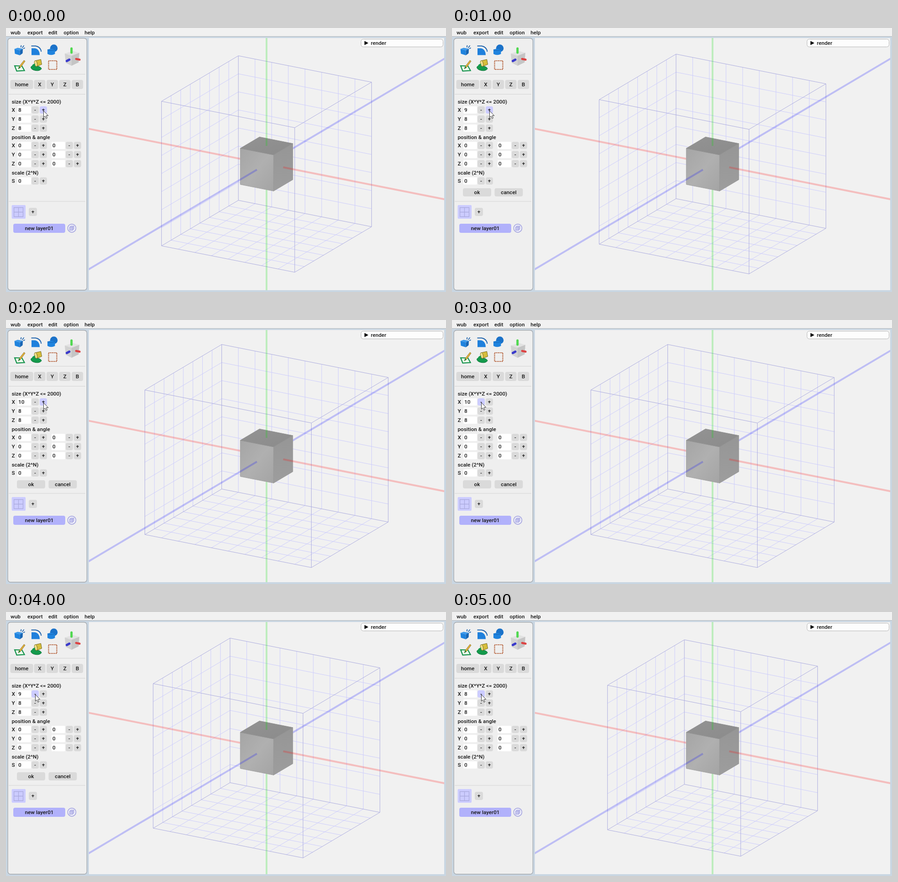
Animation, 966 px wide and 580 px high, one loop 6000 ms. Source, as an HTML page:

```html
<!DOCTYPE html>
<html lang="en">
<head>
<meta charset="utf-8">
<title>Voxel editor</title>
<style>
html, body { margin: 0; width: 100%; height: 100%; overflow: hidden; background: #c9d6e2; }
svg { display: block; width: 966px; height: 580px; }
text { font: 500 11.7px Roboto, sans-serif; fill: #161616; white-space: pre; }
.mid { text-anchor: middle; }
.btn { fill: #dadada; }
.hot { fill: #ccccff; }
.grid { stroke: #cdcdfc; fill: none; }
.edge { stroke: #acacdf; fill: none; }
.axis { stroke-width: 4; stroke-opacity: .21; }
</style>
</head>
<body>
<svg id="stage" viewBox="0 0 966 580">
  <defs>
    <clipPath id="view"><rect x="182" y="22" width="780" height="554"/></clipPath>
    <linearGradient id="front" x1="0" y1="0" x2="1" y2="1">
      <stop offset="0" stop-color="#a5a5a5"/><stop offset=".5" stop-color="#b0b0b0"/><stop offset="1" stop-color="#a4a4a4"/>
    </linearGradient>
    <linearGradient id="top" x1="0" y1="0" x2="1" y2="1">
      <stop offset="0" stop-color="#939393"/><stop offset="1" stop-color="#8b8b8b"/>
    </linearGradient>
    <linearGradient id="side" x1="0" y1="0" x2="0" y2="1">
      <stop offset="0" stop-color="#969696"/><stop offset="1" stop-color="#9d9d9d"/>
    </linearGradient>
  </defs>
  <rect width="966" height="18" fill="#f1f1f1"/>
  <path d="M0 18.5H966" stroke="#b4b8bc"/>
  <rect x="182" y="22" width="780" height="554" fill="#f1f1f1"/>
  <g id="scene" clip-path="url(#view)"></g>

  <rect x="779.5" y="24.5" width="180" height="17" rx="5" fill="#fdfdfd" stroke="#b5b5b5"/>
  <path d="M787 28.5L795.5 33 787 37.5Z" fill="#000"/>

  <rect x="4" y="22.5" width="173.500" height="553.5" rx="6" fill="#efefef" stroke="#a3a8ad" stroke-width="1.3"/>
  <path d="M6 101.500H174M6 145.500H174M6 381H174" stroke="#d3d3d3"/>

  <!-- tool icons -->
  <g>
    <path d="M18.500 46L30.500 49V60L19.500 56.500Z" fill="#1f83de"/>
    <path d="M30.500 49L37 45.500 36.500 55.500 30.500 60Z" fill="#1765b4"/>
    <path d="M18.500 46L25.500 43.500 37 45.500 30.500 49Z" fill="#3b98ea"/>
    <path d="M32.500 42.500L33.500 38M35.500 43.500L39.500 38.500M38 45.500L41.500 43.500" stroke="#1d62ac" stroke-width="1.8"/>
    <path d="M56 44.500H63Q73.500 46 74 59.500H56Z" fill="#1f80dc"/>
    <path d="M55.500 39.500H65Q76 41.500 77.500 52" fill="none" stroke="#1d62ac" stroke-width="1.8"/>
    <circle cx="105" cy="44.500" r="8.300" fill="#1b72c9"/>
    <path d="M91 47.500Q99 44 107.500 47.500V57Q99 61.500 91 57Z" fill="#1f83de"/>
    <path d="M91 47.500Q99 51.500 107.500 47.500" fill="none" stroke="#1765b4"/>
    <path d="M19 83L35 83.500 40.500 93.500 23.500 94.500Z" fill="#e9f7e9" stroke="#12914a" stroke-width="2.200"/>
    <path d="M27 90L29 84.500 39.500 71 42 73 32 86.500Z" fill="#e3b23a" stroke="#7d6424" stroke-width=".8"/>
    <path d="M27 90L29 84.500 32 86.500Z" fill="#16843d"/>
    <path d="M54.500 86Q57 81 67 83 77 85 78 89.500 74 95 65 93.500 55 92 54.500 86Z" fill="#149a4c" stroke="#0e7339"/>
    <path d="M64 72L76.500 69 78.500 80 67 84.500Z" fill="#d7be3c" stroke="#76691f"/>
    <ellipse cx="65.500" cy="78" rx="3" ry="6.500" transform="rotate(-14 65.500 78)" fill="#f0e08a" stroke="#76691f"/>
    <path d="M64 80Q58 80 57.500 88" fill="none" stroke="#149a4c" stroke-width="3"/>
    <rect x="93.500" y="72" width="18" height="19" fill="none" stroke="#b0562d" stroke-width="2.200" stroke-dasharray="2.200 1.500"/>
    <path d="M129 56L147 50.500 161 54.500 144 61Z" fill="#e2e2e2"/>
    <path d="M129 56L144 61V83L131 76.500Z" fill="#d2d2d2"/>
    <path d="M144 61L161 54.500 159.500 75.500 144 83Z" fill="#c5c5c5"/>
    <path d="M143.800 45V54" stroke="#50d850" stroke-width="5" stroke-linecap="round"/>
    <path d="M154 68L161.500 69.500" stroke="#dc4343" stroke-width="4.600" stroke-linecap="round"/>
    <path d="M139 69.500L133.500 72.500" stroke="#3a3acb" stroke-width="5" stroke-linecap="round"/>
  </g>

  <g id="panel"></g>

  <!-- layer list -->
  <rect x="12.500" y="389" width="30.500" height="30" rx="2" class="hot"/>
  <path d="M17.500 394.500H37.500V414.500H17.500ZM27.500 394.500V414.500M17.500 404.500H37.500" fill="none" stroke="#ababde" stroke-width="1.300"/>
  <circle cx="144.500" cy="439.800" r="9" fill="#f0f0fb" stroke="#a6a6df" stroke-width="1.700"/>
  <path d="M139.500 437.500L142 435H149V441.500L146.500 444.500H139.500Z" fill="#c4c4ee" stroke="#a6a6df"/>
  <path d="M139.500 437.500H146.500V444.500M146.500 437.500L149 435" fill="none" stroke="#a6a6df"/>

  <path id="cursor" d="M0 0V14.500L3.300 11.500 5.600 16.700 8 15.700 5.700 10.600H10.300Z" fill="#fff" stroke="#333"/>
</svg>
<script>
const NS = 'http://www.w3.org/2000/svg';
const $ = id => document.getElementById(id);
const stage = $('stage'), scene = $('scene'), panel = $('panel'), cursor = $('cursor');

function add(parent, tag, attrs, content = '') {
  const el = document.createElementNS(NS, tag);
  for (const key in attrs) el.setAttribute(key, attrs[key]);
  el.textContent = content;
  parent.append(el);
  return el;
}
const label = (x, y, s, parent = panel) => add(parent, 'text', { x, y }, s);
function button(cx, cy, w, h, s, parent = panel) {
  const box = add(parent, 'rect', { x: cx - w / 2, y: cy - h / 2, width: w, height: h, rx: 4, class: 'btn' });
  add(parent, 'text', { x: cx, y: cy + 4.1, class: 'mid' }, s);
  return box;
}
function field(x, cy) {
  add(panel, 'rect', { x, y: cy - 8, width: 30, height: 16, rx: 2, fill: '#fff' });
  return label(x + 2, cy + 4.1, '0');
}
function spinner(x, cy) {
  const value = field(x, cy);
  return { value, minus: button(x + 39, cy, 16, 16, '-'), plus: button(x + 57, cy, 16, 16, '+') };
}
function row(name, cy, wide) {
  label(12.5, cy + 4.1, name);
  if (wide) spinner(100, cy);
  return spinner(25, cy);
}

// Menu and panel
[['wub', 10], ['export', 47], ['edit', 93], ['option', 126.5], ['help', 172.5]]
  .forEach(([s, x]) => label(x, 14, s));
label(801, 37, 'render');
button(34.5, 124, 50, 20, 'home');
[...'XYZB'].forEach((s, i) => button(74 + 27.6 * i, 124, 25, 20, s));
label(12.5, 165.5, 'size (X*Y*Z <= 2000)');
const sizes = [...'XYZ'].map((s, i) => row(s, 180 + 20 * i));
sizes.forEach(s => s.value.textContent = 8);
label(12.5, 244, 'position & angle');
[...'XYZ'].forEach((s, i) => row(s, 258 + 20 * i, true));
label(12.5, 322, 'scale (2^N)');
row('S', 336);
const confirm = add(panel, 'g', {});
button(55, 361, 62, 18, 'ok', confirm);
button(124.5, 361, 62, 18, 'cancel', confirm);
button(59, 404, 18, 18, '+');
button(73, 440, 114, 20, 'new layer01').style.fill = '#b1b1fb';

// Orthographic projection of voxel units
const project = (x, y, z) =>
  (572 + 36.56 * x - 21.1 * z).toFixed(2) + ' ' + (298.8 + 7.25 * x - 39.7 * y + 12.5 * z).toFixed(2);
const line = (a, b) => `M${project(...a)}L${project(...b)}`;
const face = pts => 'M' + pts.map(p => project(...p)).join('L') + 'Z';
const path = (attrs, d = '') => add(scene, 'path', { d, ...attrs });

const grid = path({ class: 'grid' });
const edges = path({ class: 'edge' });
const FAR = 30;
const axes = [['#f00', [1, 0, 0]], ['#0d0', [0, 1, 0]], ['#00f', [0, 0, 1]]];
function halfAxes(side) {
  for (const [stroke, dir] of axes)
    path({ class: 'axis', stroke }, line(dir.map(v => v * side), dir.map(v => v * side * FAR)));
}
halfAxes(-1);
path({ fill: 'url(#front)', stroke: '#a2a2a2' }, face([[-1, 1, 1], [1, 1, 1], [1, -1, 1], [-1, -1, 1]]));
path({ fill: 'url(#side)', stroke: '#999' }, face([[1, 1, 1], [1, 1, -1], [1, -1, -1], [1, -1, 1]]));
path({ fill: 'url(#top)', stroke: '#929292' }, face([[-1, 1, 1], [1, 1, 1], [1, 1, -1], [-1, 1, -1]]));
halfAxes(1);

function drawBounds(nx) {
  const w = nx / 2, h = 4, d = 4;
  let g = '', e = '';
  for (let x = 1 - w; x < w; x++) g += line([x, h, -d], [x, -h, -d]) + line([x, -h, -d], [x, -h, d]);
  for (let y = 1 - h; y < h; y++) g += line([-w, y, d], [-w, y, -d]) + line([-w, y, -d], [w, y, -d]);
  for (let z = 1 - d; z < d; z++) g += line([-w, h, z], [-w, -h, z]) + line([-w, -h, z], [w, -h, z]);
  for (const a of [-1, 1]) for (const b of [-1, 1])
    e += line([-w, a * h, b * d], [w, a * h, b * d])
       + line([a * w, -h, b * d], [a * w, h, b * d])
       + line([a * w, b * h, -d], [a * w, b * h, d]);
  grid.setAttribute('d', g);
  edges.setAttribute('d', e);
}

let shown = -1;
function render(time) {
  const step = Math.floor(time % 6000 / 1000);
  if (step === shown) return;
  shown = step;
  const nx = 8 + Math.min(step, 5 - step), down = step > 2;
  const { value, minus, plus } = sizes[0];
  value.textContent = nx;
  minus.setAttribute('class', down ? 'hot' : 'btn');
  plus.setAttribute('class', down ? 'btn' : 'hot');
  confirm.setAttribute('visibility', nx > 8 ? 'visible' : 'hidden');
  cursor.setAttribute('transform', down ? 'translate(64.5 181.5)' : 'translate(82.5 182)');
  drawBounds(nx);
}

const start = performance.now();
function tick() {
  render(performance.now() - start);
  requestAnimationFrame(tick);
}
tick();
</script>
</body>
</html>
```
